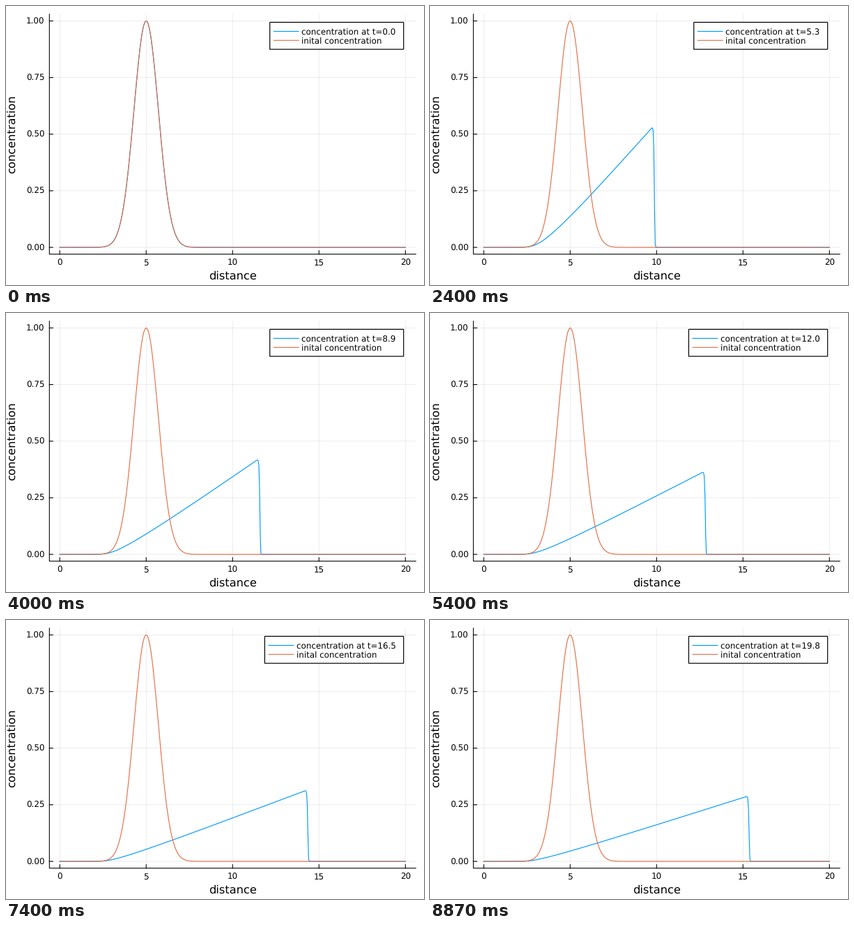
Write a matplotlib script that moves like this. It is 600 by 400 pixels and loops after 8940 ms.

```python
import numpy as np
import matplotlib.pyplot as plt
from matplotlib.animation import FuncAnimation
from matplotlib.patches import Rectangle

W, H, DPI = 600, 400, 100
PT = 72 / DPI                      # points per pixel
FRAMES, LOOP = 134, 8940
T_END, LENGTH, CELLS, SUBSTEPS = 20.0, 20.0, 500, 20
BLUE, ORANGE = "#009AFA", "#E36F47"
LEFT, RIGHT, TOP, BOTTOM = 62.3, 588.2, 11.7, 355.8
SMALL, LARGE = 11.9 * PT, 16.3 * PT

plt.rcParams.update({"font.family": "DejaVu Sans", "text.hinting": "none"})

x = np.linspace(0, LENGTH, CELLS + 1)
start = np.exp(-(x - 5) ** 2)


def solve():
    """Upwind solution of u_t + (u^2)_x = 0, one row per frame."""
    dx = x[1] - x[0]
    dt = T_END / (FRAMES - 1) / SUBSTEPS
    u = start.copy()
    rows = [u.copy()]
    for _ in range(FRAMES - 1):
        for _ in range(SUBSTEPS):
            u[1:] -= dt / dx * np.diff(u * u)
        rows.append(u.copy())
    return rows


def px(v):
    return LEFT + (v + 0.03 * LENGTH) / (1.06 * LENGTH) * (RIGHT - LEFT)


def py(v):
    return BOTTOM - (v + 0.03) / 1.06 * (BOTTOM - TOP)


fig = plt.figure(figsize=(W / DPI, H / DPI), dpi=DPI, facecolor="white")
ax = fig.add_axes([0, 0, 1, 1])
ax.set(xlim=(0, W), ylim=(H, 0))
ax.axis("off")


def line(xs, ys, color="black", width=1.1, **kw):
    return ax.plot(xs, ys, color=color, lw=width * PT, snap=False, **kw)[0]


def label(x0, y0, text, size=SMALL, **kw):
    return ax.text(x0, y0, text, fontsize=size, **kw)


for v in range(0, 21, 5):
    line([px(v)] * 2, [TOP, BOTTOM], width=0.7, alpha=0.1)
    line([px(v)] * 2, [BOTTOM, BOTTOM - 5])
    label(px(v), 371.6, str(v), ha="center", va="baseline")
for v in np.linspace(0, 1, 5):
    line([LEFT, RIGHT], [py(v)] * 2, width=0.7, alpha=0.1)
    line([LEFT, LEFT + 5], [py(v)] * 2)
    label(55.2, py(v) + 4.4, f"{v:.2f}", ha="right", va="baseline")
line([LEFT, LEFT, RIGHT], [TOP, BOTTOM, BOTTOM])

label((LEFT + RIGHT) / 2, 392, "distance", LARGE, ha="center", va="baseline")
label(16.3, (TOP + BOTTOM) / 2, "concentration", LARGE, rotation=90,
      ha="right", va="center")

curve = line(px(x), py(start), BLUE, 1.15, zorder=3)
line(px(x), py(start), ORANGE, 1.15, zorder=4)

box = Rectangle((378.7, 23.4), 192, 38.7, fc="white", ec="black",
                lw=1.2 * PT, zorder=5, snap=False)
ax.add_patch(box)
keys = [line([0, 1], [y0] * 2, c, 1.15, zorder=6)
        for y0, c in ((36.4, BLUE), (49.3, ORANGE))]
names = [label(0, y0, "", va="baseline", zorder=6) for y0 in (40.7, 53.6)]
names[1].set_text("inital concentration")

solution = solve()


def draw(i):
    t = T_END * i / (FRAMES - 1)
    time = f"{t:.1f}"
    left = 378.7 - (7.3 if len(time) > 3 else 0)
    curve.set_ydata(py(solution[i]))
    box.set_x(left)
    box.set_width(570.7 - left)
    for key, name in zip(keys, names):
        key.set_xdata([left + 5.6, left + 41.4])
        name.set_x(left + 45.6)
    names[0].set_text(f"concentration at t={time}")
    return [curve, box, *keys, *names]


anim = FuncAnimation(fig, draw, frames=FRAMES, interval=LOOP / FRAMES,
                     init_func=lambda: draw(0), repeat=True, repeat_delay=0)
plt.show()
```
